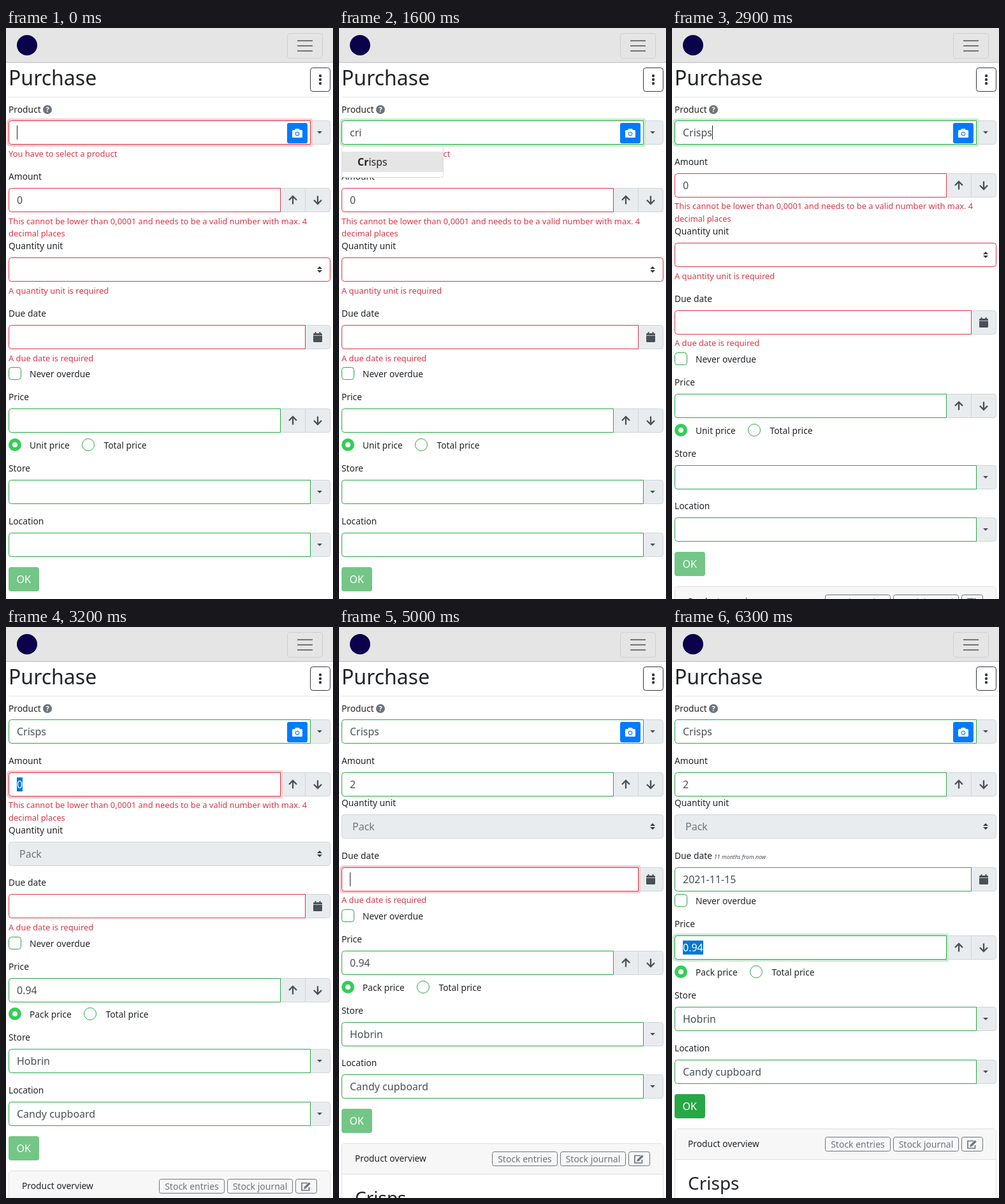
Animation of 513x896 px, one loop 8000 ms. Source, as an HTML page with a canvas:

```html
<!DOCTYPE html>
<html lang="en">
<head>
<meta charset="utf-8">
<title>Purchase</title>
<style>
  html, body { margin: 0; width: 100%; height: 100%; overflow: hidden; background: #fff; }
  canvas { display: block; width: 513px; height: 896px; }
</style>
</head>
<body>
<canvas id="stage"></canvas>
<script>
const W = 513, H = 896, LOOP = 8000;
const canvas = document.getElementById('stage');
const ctx = canvas.getContext('2d');
const dpr = window.devicePixelRatio || 1;
canvas.width = W * dpr;
canvas.height = H * dpr;

const RED = [220, 53, 69], GREEN = [40, 167, 69];
const INK = '#212529', BODY = '#495057', MUTED = '#6c757d';
const ADDON = '#e9ecef', EDGE = '#ced4da', ERROR = '#dc3545', OKAY = '#28a745';
const PRODUCTS = ['Cheese', 'Chocolate', 'Cold cuts', 'Cookies', 'Crisps', 'Cucumber',
  'Pickles', 'Radicchio', 'Sliced cheese', 'Spinach'];

// Each entry changes part of the form state from its time on.
const STEPS = [
  [0, { product: '', amount: '0', unit: '', due: '', price: '', store: '', place: '',
        query: '', focus: 'product', caret: true, selected: false, glow: { product: 1 },
        tone: { product: 0, amount: 0, due: 0, price: 1 },
        noProduct: true, noAmount: true, noUnit: true, noDue: true }],
  [500, { caret: false }],
  [1100, { product: 'c', caret: true, tone: { product: .5 } }],
  [1200, { tone: { product: 1 } }],
  [1300, { query: 'c' }],
  [1400, { product: 'cr' }],
  [1500, { query: 'cr' }],
  [1600, { product: 'cri', caret: false }],
  [1800, { query: 'cri' }],
  [2100, { caret: true }],
  [2700, { caret: false }],
  [2900, { product: 'Crisps', query: '', caret: true, noProduct: false }],
  [3000, { unit: 'Pack', price: '0.94', store: 'Hobrin', place: 'Candy cupboard', noUnit: false }],
  [3100, { focus: 'amount', selected: true, glow: { product: .35, amount: .65 } }],
  [3200, { glow: { amount: 1 } }],
  [4300, { amount: '2', selected: false, tone: { amount: .5 }, noAmount: false }],
  [4400, { tone: { amount: 1 } }],
  [4600, { caret: false }],
  [4800, { focus: 'due', caret: true, glow: { amount: .65, due: .35 } }],
  [4900, { glow: { amount: .1, due: .9 } }],
  [5000, { glow: { due: 1 } }],
  [5400, { due: '1' }],
  [5600, { due: '11' }],
  [5900, { caret: false }],
  [6100, { due: '2021-11-15', caret: true, noDue: false, tone: { due: .5 } }],
  [6200, { focus: 'price', selected: true, tone: { due: 1 }, glow: { due: .35, price: .65 } }],
  [6300, { glow: { price: 1 } }]
];

function stateAt(t) {
  const s = {};
  for (const [at, patch] of STEPS) {
    if (at > t) break;
    const tone = { ...s.tone, ...patch.tone };
    Object.assign(s, patch, { tone });
  }
  return s;
}

function blend(k, alpha = 1) {
  const c = RED.map((v, i) => Math.round(v + (GREEN[i] - v) * k));
  return `rgba(${c},${alpha})`;
}

function text(str, x, y, size = 13.8, color = INK, style = '') {
  ctx.font = `${style} ${size}px "Noto Sans", "Open Sans", sans-serif`;
  ctx.fillStyle = color;
  ctx.fillText(str, x, y);
  return ctx.measureText(str).width;
}

function box(x, y, w, h, r, fill, edge) {
  const inset = edge ? .5 : 0;
  ctx.beginPath();
  ctx.roundRect(x + inset, y + inset, w - 2 * inset, h - 2 * inset, r);
  if (fill) { ctx.fillStyle = fill; ctx.fill(); }
  if (edge) { ctx.strokeStyle = edge; ctx.lineWidth = 1; ctx.stroke(); }
}

function disc(x, y, r, fill, edge) {
  ctx.beginPath();
  ctx.arc(x, y, r, 0, 7);
  if (fill) { ctx.fillStyle = fill; ctx.fill(); }
  if (edge) { ctx.strokeStyle = edge; ctx.lineWidth = 1; ctx.stroke(); }
}

function poly(points, color) {
  ctx.beginPath();
  points.forEach(([x, y]) => ctx.lineTo(x, y));
  ctx.fillStyle = color;
  ctx.fill();
}

function line(points, color, width) {
  ctx.beginPath();
  points.forEach(([x, y]) => ctx.lineTo(x, y));
  ctx.strokeStyle = color;
  ctx.lineWidth = width;
  ctx.stroke();
}

// dir is -1 for a triangle or arrow pointing up, 1 for down.
const triangle = (x, y, dir, color) => poly([[x - 4, y], [x + 4, y], [x, y + 4 * dir]], color);

function arrow(x, y, dir) {
  line([[x, y - 6.5 * dir], [x, y + 5 * dir]], BODY, 2.3);
  line([[x - 6, y], [x, y + 6 * dir], [x + 6, y]], BODY, 2.3);
}

function calendar(x, y) {
  box(x - 7, y - 6, 14, 3.2, [1.5, 1.5, 0, 0], BODY);
  box(x - 7, y - 2, 14, 10, [0, 0, 1.5, 1.5], BODY);
  box(x - 4.5, y - 8, 2, 3, .5, BODY);
  box(x + 2.5, y - 8, 2, 3, .5, BODY);
}

function camera(x, y) {
  box(x - 16, y - 16, 32, 32, 3, '#007bff');
  box(x - 8, y - 5, 16, 12, 1.5, '#fff');
  poly([[x - 4, y - 4], [x - 3, y - 7], [x + 3, y - 7], [x + 4, y - 4]], '#fff');
  disc(x, y + 1, 3.3, '#007bff');
  disc(x, y + 1, 2.3, '#fff');
}

const addon = (x, y, w, last) => box(x, y, w, 38, last ? [0, 4, 4, 0] : 0, ADDON, EDGE);

function field(s, name, y, w) {
  const k = s.tone[name] ?? 1, value = s[name], glow = s.glow[name];
  if (glow) {
    box(1, y - 3, w + 6, 44, [6, 2, 2, 6], '#fff');
    box(1, y - 3, w + 6, 44, [6, 2, 2, 6], blend(k, .25 * glow));
  }
  box(4, y, w, 38, [4, 0, 0, 4], '#fff', blend(k));
  const active = s.focus === name, marked = active && s.selected;
  if (marked) {
    ctx.font = '16px "Noto Sans", "Open Sans", sans-serif';
    ctx.fillStyle = '#0078d7';
    ctx.fillRect(17, y + 8, Math.round(ctx.measureText(value).width), 22);
  }
  const width = text(value, 17, y + 25, 16, marked ? '#fff' : BODY);
  if (active && s.caret && !marked) {
    ctx.fillStyle = INK;
    ctx.fillRect(17 + Math.round(width), y + 8, 1, 22);
  }
}

function comboField(s, name, y) {
  addon(477, y, 32, true);
  triangle(492, y + 17, 1, BODY);
  field(s, name, y, 474);
}

function numberField(s, name, y) {
  addon(430, y, 40);
  addon(469, y, 40, true);
  arrow(450, y + 19, -1);
  arrow(489, y + 19, 1);
  field(s, name, y, 427);
}

const label = (str, y) => text(str, 4, y - 13);
const error = (str, y) => text(str, 4, y, 12.9, ERROR);

function header() {
  ctx.fillStyle = '#e5e5e5';
  ctx.fillRect(0, 0, W, 53);
  ctx.fillStyle = '#d2d2d2';
  ctx.fillRect(0, 53, W, 2);
  disc(33, 27, 16, '#0b024c');
  box(441, 8, 56, 40, 4, null, '#cfcfcf');
  for (const y of [20, 28, 36]) line([[457, y], [481, y]], '#747474', 2);
  text('Purchase', 4, 90, 32);
  box(477, 62, 32, 38, 4, '#fff', '#343a40');
  for (const y of [75, 81, 87]) disc(493, y, 2.2, '#343a40');
  ctx.fillStyle = '#e5e5e5';
  ctx.fillRect(4, 108, 505, 1);
  text('Product', 4, 133);
  disc(65, 128, 7, MUTED);
  ctx.textAlign = 'center';
  text('?', 65, 132, 11, '#fff', 'bold');
  ctx.textAlign = 'left';
}

function unitSelect(s, y) {
  label('Quantity unit', y);
  box(4, y, 505, 38, 4, s.unit ? ADDON : '#fff', s.unit ? EDGE : ERROR);
  text(s.unit, 21, y + 25, 16, MUTED);
  triangle(492, y + 18, -1, '#343a40');
  triangle(492, y + 20, 1, '#343a40');
  if (s.noUnit) error('A quantity unit is required', y + 57);
}

function radios(s, y) {
  const x = s.unit ? 132 : 129;
  disc(14, y, 10, '#34ce57');
  disc(14, y, 4, '#fff');
  text(s.unit ? 'Pack price' : 'Unit price', 37, y + 6);
  disc(x, y, 9.5, '#fff', OKAY);
  text('Total price', x + 24.5, y + 6);
}

function overview(y) {
  box(4, y, 505, 200, 4, '#fff', '#dfdfdf');
  box(5, y + 1, 503, 47, [3, 3, 0, 0], '#f7f7f7');
  ctx.fillStyle = '#dfdfdf';
  ctx.fillRect(5, y + 48, 503, 1);
  text('Product overview', 25, y + 29);
  ctx.textAlign = 'center';
  for (const [str, x] of [['Stock entries', 240], ['Stock journal', 347]]) {
    box(x, y + 13, 103, 23, 3, null, MUTED);
    text(str, x + 51.5, y + 30, 14, MUTED);
  }
  ctx.textAlign = 'left';
  box(454, y + 13, 34, 23, 3, null, MUTED);
  line([[473, y + 19.5], [464, y + 19.5], [464, y + 31], [475.5, y + 31], [475.5, y + 26]], MUTED, 1.7);
  line([[469, y + 27], [476.5, y + 19.5]], MUTED, 3.4);
  poly([[467, y + 29], [468, y + 25.5], [470.5, y + 28]], MUTED);
  text('Crisps', 25, y + 96, 28);
}

function suggestions(query) {
  const hits = PRODUCTS.filter(p => p.toLowerCase().includes(query));
  const full = 18 + 32 * hits.length, h = Math.min(full, 300), y = 185;
  box(4, y, 160, h, 4, '#fff', '#d9d9d9');
  ctx.save();
  ctx.beginPath();
  ctx.rect(5, y + 1, 158, h - 2);
  ctx.clip();
  ctx.fillStyle = '#e5e5e5';
  ctx.fillRect(5, y + 9, 158, 32);
  hits.forEach((name, i) => {
    const from = name.toLowerCase().indexOf(query), to = from + query.length;
    const parts = [[name.slice(0, from), ''], [name.slice(from, to), 'bold'], [name.slice(to), '']];
    let x = 29;
    for (const [part, style] of parts) x += text(part, x, y + 31 + 32 * i, 16, INK, style);
  });
  if (full > h) {
    ctx.fillStyle = '#f0f0f0';
    ctx.fillRect(146, y + 1, 17, h - 2);
    ctx.fillStyle = '#cdcdcd';
    ctx.fillRect(147, y + 18, 15, (h - 36) * h / full);
  }
  ctx.restore();
}

function draw(t) {
  const s = stateAt(t);
  ctx.setTransform(dpr, 0, 0, dpr, 0, 0);
  ctx.fillStyle = '#fff';
  ctx.fillRect(0, 0, W, H);
  header();

  comboField(s, 'product', 145);
  camera(457, 165);
  if (s.noProduct) error('You have to select a product', 202);

  // Hidden messages pull up everything below them.
  let shift = s.noProduct ? 0 : 23.4;
  const at = y => Math.round(y - shift);

  let y = at(251);
  label('Amount', y);
  numberField(s, 'amount', y);
  if (s.noAmount) {
    error('This cannot be lower than 0,0001 and needs to be a valid number with max. 4', at(307.8));
    error('decimal places', at(327));
  } else shift += 42.6;

  unitSelect(s, at(360.2));
  if (!s.noUnit) shift += 23.4;

  y = at(466.2);
  label('Due date', y);
  addon(469, y, 40, true);
  calendar(489, y + 19);
  field(s, 'due', y, 466);
  if (s.noDue) error('A due date is required', at(522.8));
  else {
    text('11 months from now', 66, y - 13.5, 8.8, BODY, 'italic');
    shift += 23.6;
  }

  y = at(542.4);
  box(4, y - 10, 20, 20, 4, '#fff', OKAY);
  text('Never overdue', 37, y + 6);

  y = at(597.3);
  label('Price', y);
  numberField(s, 'price', y);
  radios(s, at(654.2));

  y = at(709.2);
  label('Store', y);
  comboField(s, 'store', y);

  y = at(791.8);
  label('Location', y);
  comboField(s, 'place', y);

  y = at(845.8);
  box(4, y, 48, 38, 4, s.noDue ? '#73c686' : OKAY);
  text('OK', 16.5, y + 25, 16, '#fff');

  if (!s.noProduct) overview(at(899.6));
  if (s.query) suggestions(s.query);
}

const start = performance.now();
function tick() {
  draw((performance.now() - start) % LOOP);
  requestAnimationFrame(tick);
}
tick();
</script>
</body>
</html>
```
